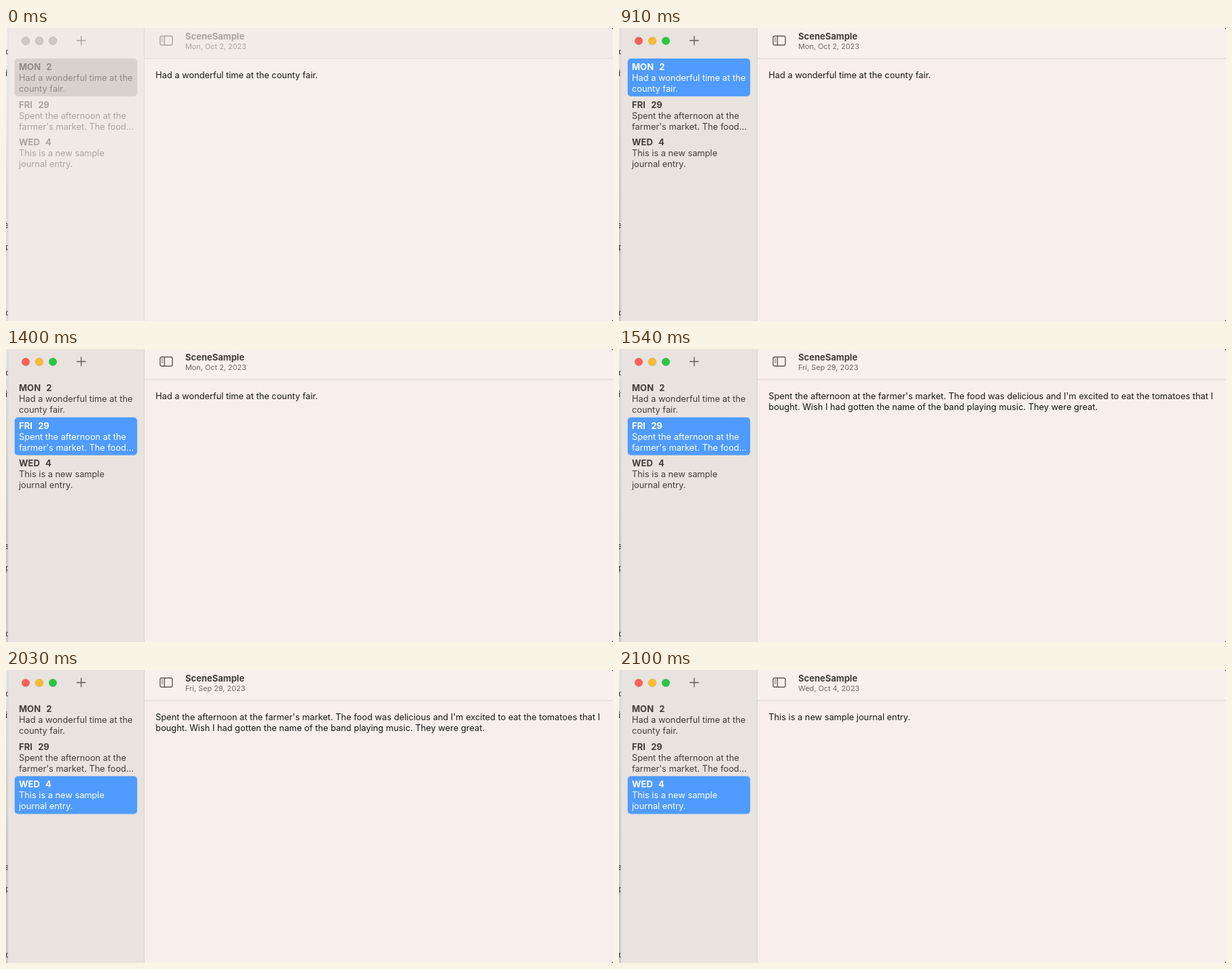
Animation, 894 px wide and 432 px high, one loop 3.22 s. Source, as an HTML page:

```html
<!DOCTYPE html>
<html lang="en">
<head>
<meta charset="utf-8">
<title>Journal</title>
<style>
  html, body { margin: 0; width: 100%; height: 100%; overflow: hidden; }
  svg { display: block; width: 894px; height: 432px; }
  text { font: 12.81px Inter, sans-serif; white-space: pre; }
  .bold { font-size: 13px; font-weight: 700; }
  .date { font-size: 10.9px; }

  :root, .mark, .row, .entry { animation: 3220ms step-end infinite; }

  /* Window gains focus */
  :root { animation-name: focus; }
  @keyframes focus {
    0%, 100% {
      --side: #efeae6; --bar: #f1ece8; --page: #f5f0ec; --line: #dfdad6;
      --title: #aaa5a2; --sub: #aca7a4; --icon: #aaa5a2;
      --red: #cfc9c6; --yellow: #cfc9c6; --green: #cfc9c6; --ring: #bbb5b2;
      --back: #f3f3f2; --shade: #dddcdb;
    }
    28.261% {
      --side: #e8e3df; --bar: #f8f0ed; --page: #f8efec; --line: #d9d3d0;
      --title: #403d3b; --sub: #6f6a68; --icon: #615d5b;
      --red: #ff5f57; --yellow: #febc2e; --green: #28c840; --ring: #00000026;
      --back: #e6e5e5; --shade: #c9c8c8;
    }
  }
  .side { fill: var(--side); }
  .bar { fill: var(--bar); }
  .page { fill: var(--page); }
  .line { fill: var(--line); }
  .title { fill: var(--title); }
  .date { fill: var(--sub); }
  .icon { fill: none; stroke: var(--icon); stroke-width: 1.4; stroke-linecap: round; }
  .dots { stroke: var(--ring); stroke-width: .8; }

  /* Selection steps down the list */
  .mark { animation-name: mark; }
  @keyframes mark {
    0%, 100% { fill: #d9d1cd; transform: none; }
    28.261% { fill: #4f9bff; transform: none; }
    43.478% { fill: #4f9bff; transform: translateY(55.8px); }
    63.043% { fill: #4f9bff; transform: translateY(111.5px); }
  }
  .mon { animation-name: mon; }
  .fri { animation-name: fri; }
  .wed { animation-name: wed; }
  @keyframes mon {
    0%, 100% { fill: #918a87; }
    28.261% { fill: #fff; }
    43.478% { fill: #413e3c; }
  }
  @keyframes fri {
    0%, 100% { fill: #aaa5a2; }
    28.261%, 63.043% { fill: #413e3c; }
    43.478% { fill: #fff; }
  }
  @keyframes wed {
    0%, 100% { fill: #aaa5a2; }
    28.261% { fill: #413e3c; }
    63.043% { fill: #fff; }
  }

  /* The detail pane follows a beat later */
  .entry { fill: #181716; }
  .first { animation-name: first; }
  .second { animation-name: second; }
  .third { animation-name: third; }
  @keyframes first { 0%, 100% { opacity: 1; } 45.652% { opacity: 0; } }
  @keyframes second { 0%, 65.217%, 100% { opacity: 0; } 45.652% { opacity: 1; } }
  @keyframes third { 0%, 100% { opacity: 0; } 65.217% { opacity: 1; } }
</style>
</head>
<body>
<svg viewBox="0 0 894 432">
  <defs>
    <linearGradient id="shadow" x2="0" y2="1">
      <stop style="stop-color: var(--back)"/>
      <stop offset=".6" style="stop-color: var(--shade)"/>
      <stop offset="1" style="stop-color: var(--shade)"/>
    </linearGradient>
  </defs>

  <!-- Window behind -->
  <rect width="4" height="432" fill="url(#shadow)"/>
  <g fill="#222">
    <text x="-1" y="39">o</text>
    <text x="-1" y="71">it</text>
    <text x="-3" y="295">e</text>
    <text x="-1.5" y="327">p</text>
    <text x="-1" y="424">c</text>
  </g>

  <rect class="side" x="3" width="201" height="432"/>
  <rect class="page" x="204" width="690" height="432"/>
  <rect class="bar" x="204" width="690" height="45"/>
  <rect class="line" x="204" y="44.5" width="690" height="1"/>
  <rect class="line" x="203" width="1" height="432"/>
  <rect class="line" x="2.5" width=".8" height="432"/>
  <path d="M892 0h2v2zM894 430v2h-2z" fill="#4a4746"/>

  <g class="dots">
    <circle cx="29" cy="19" r="5.8" style="fill: var(--red)"/>
    <circle cx="49" cy="19" r="5.8" style="fill: var(--yellow)"/>
    <circle cx="69" cy="19" r="5.8" style="fill: var(--green)"/>
  </g>
  <g class="icon">
    <path d="M104.5 18.5h12.5M110.75 12.2v12.5"/>
    <rect x="227" y="11.7" width="18" height="13.6" rx="2.6"/>
    <path d="M233.4 12v13"/>
    <path d="M229.4 14.8h1.7M229.4 17.2h1.7M229.4 19.6h1.7" stroke-width="1"/>
  </g>

  <rect class="mark" x="12.7" y="45" width="180.5" height="55.7" rx="5"/>
  <g class="row mon">
    <text class="bold" x="19" y="62">MON<tspan dx="8.3">2</tspan></text>
    <text x="19" y="78">Had a wonderful time at the</text>
    <text x="19" y="94">county fair.</text>
  </g>
  <g class="row fri" transform="translate(0 56)">
    <text class="bold" x="19" y="62">FRI<tspan dx="8.3">29</tspan></text>
    <text x="19" y="78">Spent the afternoon at the</text>
    <text x="19" y="94">farmer's market. The food…</text>
  </g>
  <g class="row wed" transform="translate(0 111.4)">
    <text class="bold" x="19" y="62">WED<tspan dx="8.3">4</tspan></text>
    <text x="19" y="78">This is a new sample</text>
    <text x="19" y="94">journal entry.</text>
  </g>

  <text class="bold title" x="264" y="17">SceneSample</text>
  <g class="entry first">
    <text class="date" x="264" y="31">Mon, Oct 2, 2023</text>
    <text x="220.3" y="74">Had a wonderful time at the county fair.</text>
  </g>
  <g class="entry second">
    <text class="date" x="264" y="31">Fri, Sep 29, 2023</text>
    <text x="220.3" y="74">Spent the afternoon at the farmer's market. The food was delicious and I'm excited to eat the tomatoes that I</text>
    <text x="220.3" y="90">bought. Wish I had gotten the name of the band playing music. They were great.</text>
  </g>
  <g class="entry third">
    <text class="date" x="264" y="31">Wed, Oct 4, 2023</text>
    <text x="220.3" y="74">This is a new sample journal entry.</text>
  </g>
</svg>
</body>
</html>
```
